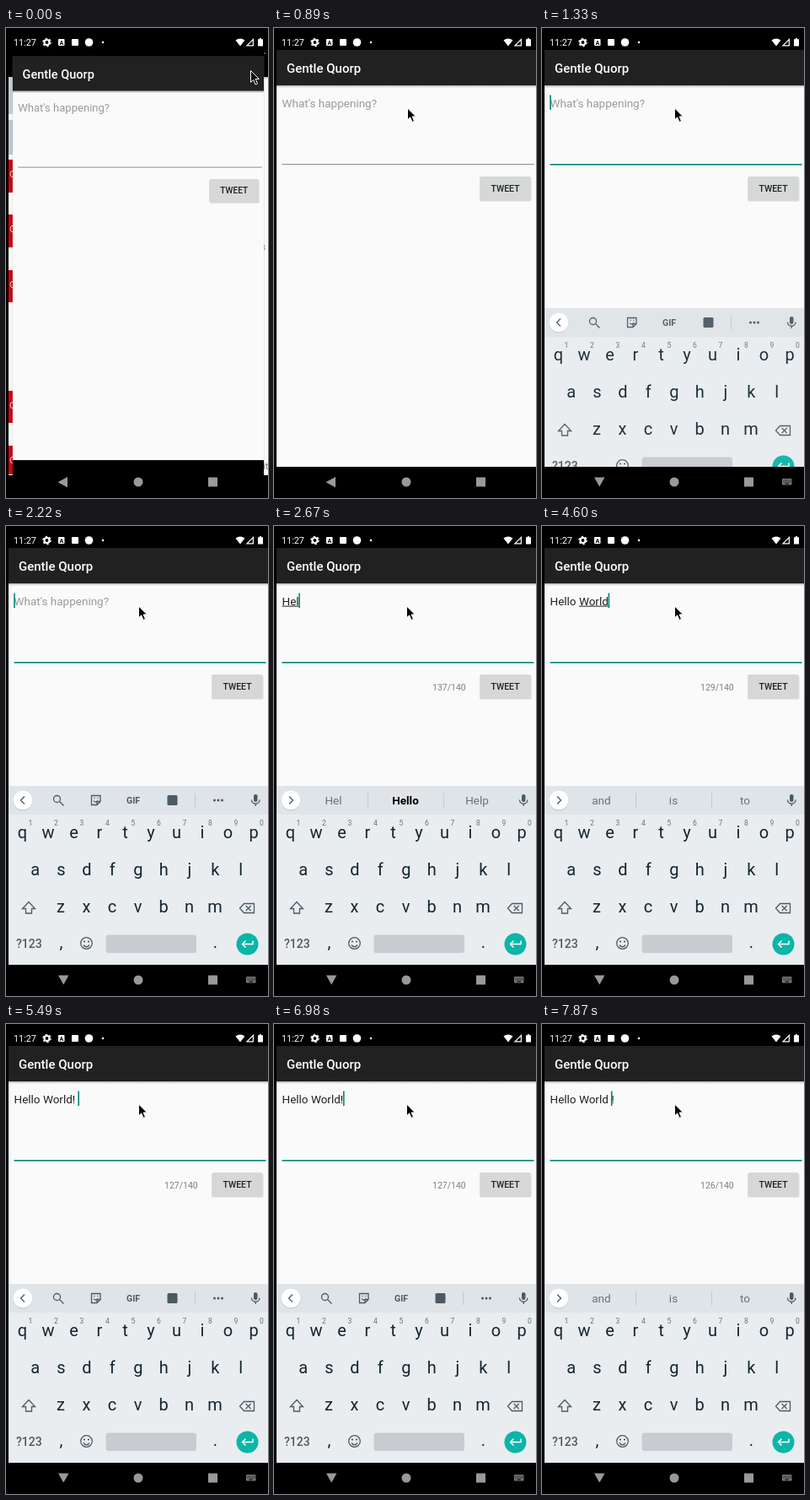
These frames come from a looping animation (311x557 px, 8 s). An HTML page:

```html
<!DOCTYPE html>
<html lang="en">
<head>
<meta charset="utf-8">
<title>Compose screen</title>
<style>
  html, body { margin: 0; width: 100%; height: 100%; overflow: hidden; background: #000; }
  svg { display: block; width: 311px; height: 557px; }
  text { font-family: Roboto, sans-serif; white-space: pre; }
  .mid { text-anchor: middle; }
  .key { font-size: 20px; fill: #14252f; text-anchor: middle; }
  .hint { font-size: 8.5px; fill: #65717a; text-anchor: middle; }
  .body { font-size: 13.5px; fill: #212121; }
  .word { font-size: 13.5px; fill: #66727a; text-anchor: middle; }
  .line { fill: none; stroke: #4d5a62; stroke-width: 1.3; }
  .gray { fill: #4d5a62; }
</style>
</head>
<body>
<svg viewBox="0 0 311 557">
  <defs>
    <clipPath id="screen"><rect x="3" y="0" width="308" height="557"/></clipPath>
    <clipPath id="kbClip"><rect x="3" y="300" width="308" height="220"/></clipPath>
    <linearGradient id="shade" x2="0" y2="1">
      <stop offset="0" stop-color="#000" stop-opacity=".28"/>
      <stop offset="1" stop-color="#000" stop-opacity="0"/>
    </linearGradient>
  </defs>
  <rect width="311" height="557"/>

  <g clip-path="url(#screen)">
    <g id="feed">
      <rect x="3" y="58" width="308" height="472" fill="#fafafa"/>
      <rect x="3" y="58" width="308" height="3" fill="url(#shade)"/>
      <circle cx="307" cy="30" r="1" fill="#777"/>
      <text x="303" y="263" font-size="10" fill="#777">s</text>
      <text x="305.5" y="523" font-size="10" fill="#777">it</text>
    </g>

    <g id="app">
      <rect x="3" y="6.5" width="308" height="533"/>
      <rect x="3" y="26" width="308" height="494" fill="#fafafa"/>
      <rect x="3" y="26" width="308" height="42" fill="#212121"/>
      <rect x="3" y="68" width="308" height="3" fill="url(#shade)"/>
      <text x="15" y="53" font-size="15" font-weight="500" fill="#fff">Gentle Quorp</text>
      <text id="prompt" class="body" x="9.5" y="93.5" style="fill:#9a9a9a">What's happening?</text>
      <text id="entry" class="body" x="9.5" y="93.5"></text>
      <rect id="compose" y="94.6" height="1" fill="#212121"/>
      <rect id="caret" y="79.5" width="1.6" height="17.5" fill="#008577"/>
      <rect id="rule" x="9.5" width="299"/>
      <text id="count" x="188" y="194.5" font-size="10.5" fill="#808080"></text>
      <rect x="244" y="177" width="61.5" height="28.5" rx="2" fill="#000" opacity=".13"/>
      <rect x="244.5" y="176" width="60" height="28" rx="1.5" fill="#d6d7d7"/>
      <text class="mid" x="274.5" y="193.8" font-size="10.5" font-weight="500" fill="#212121">TWEET</text>
    </g>
  </g>

  <g clip-path="url(#kbClip)">
    <g id="board">
      <rect x="3" y="308" width="308" height="212" fill="#e9edf0"/>
      <rect x="3" y="308" width="308" height="34" fill="#dfe4e8"/>
      <circle cx="20" cy="325.8" r="11.5" fill="#000" opacity=".12"/>
      <circle cx="20" cy="325" r="11.3" fill="#fff"/>
      <path id="chevron" class="line" stroke-width="1.5"/>

      <g id="tools">
        <circle class="line" cx="60.5" cy="323.5" r="4"/>
        <path class="line" d="M63.5 326.5l5 5"/>
        <path class="line" d="M101.5 319.5h10.500v7l-4 4h-6.500zM112 326.500h-4v4M104 325.500q2 3 5 0M104.500 322.500h1M108.500 322.500h1"/>
        <text class="mid gray" x="151" y="328.7" font-size="10.5" font-weight="700">GIF</text>
        <rect class="gray" x="191.500" y="319" width="12" height="12" rx="1.500"/>
        <path d="M224.500 317v16" stroke="#c3c9cd"/>
        <circle class="gray" cx="247.500" cy="325" r="1.500"/>
        <circle class="gray" cx="252" cy="325" r="1.500"/>
        <circle class="gray" cx="256.500" cy="325" r="1.500"/>
      </g>

      <g id="words">
        <path d="M111.500 316.500v17M201.500 316.500v17" stroke="#c3c9cd"/>
        <text class="word" x="70.500" y="330"></text>
        <text class="word" x="156" y="330"></text>
        <text class="word" x="241" y="330"></text>
      </g>

      <rect class="gray" x="294" y="318" width="4.500" height="9" rx="2.250"/>
      <path class="line" d="M291.500 324.500a4.750 4.750 0 0 0 9.500 0M296.250 329v3"/>

      <g id="keys"></g>
      <path class="line" d="M27 445.500l-7.500 8h4v5.500h7v-5.500h4z"/>
      <path class="line" d="M282.500 447.500h12v11h-12l-5-5.500zM284.700 450l6 6M290.700 450l-6 6"/>
      <text x="12" y="500" font-size="14" font-weight="500" fill="#4d5a62">?123</text>
      <text class="key" x="65.500" y="500">,</text>
      <circle class="line" cx="95.500" cy="494.500" r="6.800"/>
      <path class="line" d="M92 496.500q3.500 4.500 7 0"/>
      <circle class="gray" cx="93" cy="492.500" r="1.100"/>
      <circle class="gray" cx="98" cy="492.500" r="1.100"/>
      <rect x="118.500" y="484.500" width="107.500" height="21.500" rx="3" fill="#c8ccd0"/>
      <text class="key" x="248.500" y="500">.</text>
      <circle cx="286.500" cy="495.500" r="13" fill="#0bb5a8"/>
      <path d="M293 491.500v4h-12M284.500 491.500l-4 4l4 4" fill="none" stroke="#fff" stroke-width="1.500"/>
    </g>
  </g>

  <g fill="#fff">
    <text x="9" y="21" font-size="10.800">11:27</text>
    <circle cx="48.500" cy="17" r="3" fill="none" stroke="#fff" stroke-width="2.200"/>
    <circle cx="48.500" cy="17" r="4.600" fill="none" stroke="#fff" stroke-width="1.300" stroke-dasharray="2.400 2.417"/>
    <rect x="62" y="13" width="7.500" height="8" rx="1"/>
    <text class="mid" x="65.750" y="19.800" font-size="7" font-weight="700" style="fill:#000">A</text>
    <rect x="78" y="13" width="8" height="8" rx="1"/>
    <circle cx="98.500" cy="17" r="4.800"/>
    <circle cx="115" cy="17" r="1.300"/>
    <path d="M272.500 14.500q5.500-4 11 0l-5.500 7zM294 12v9.500h-9.500z"/>
    <path d="M292.800 15v5.300h-5.300z" fill="#000"/>
    <path d="M299 13.200h2v-1.200h2v1.200h2v8.300h-6z"/>
  </g>

  <g fill="#999">
    <path id="back"/>
    <circle cx="157" cy="538" r="5.500"/>
    <rect x="240" y="532.500" width="11" height="11" rx=".5"/>
    <g id="kbIcon">
      <rect x="285" y="534" width="11.500" height="7.500" rx="1" fill="#777"/>
      <path d="M286.500 536h9M286.500 538h9" stroke="#000" stroke-dasharray="1 1"/>
      <path d="M288.500 540h4.500" stroke="#000"/>
    </g>
  </g>

  <path id="pointer" d="M0 0v13.800l3.200-3l2.300 5.600l2.500-1l-2.400-5.500h4.300z" fill="#000" stroke="#fff" stroke-width="1" stroke-linejoin="round"/>
</svg>

<script>
const LOOP = 8000;
const $ = id => document.getElementById(id);
const set = (el, attrs) => { for (const k in attrs) el.setAttribute(k, attrs[k]); };
const show = (el, on) => el.style.display = on ? "" : "none";

function add(parent, tag, attrs, text = "") {
  const el = document.createElementNS("http://www.w3.org/2000/svg", tag);
  set(el, attrs);
  el.textContent = text;
  parent.append(el);
}

function keyRow(letters, x, y, numbered) {
  [...letters].forEach((c, i) => {
    const cx = x + i * 30.5;
    add($("keys"), "text", { class: "key", x: cx, y }, c);
    if (numbered) add($("keys"), "text", { class: "hint", x: cx + 9.5, y: y - 15 }, (i + 1) % 10);
  });
}
keyRow("qwertyuiop", 19.5, 370, true);
keyRow("asdfghjkl", 34.8, 414);
keyRow("zxcvbnm", 65, 458);

// Edge of the list behind the opening screen: top, height, colour
[[60, 42, "#c3ccd6"], [109, 41, "#bcc8d4"], [156, 39, "#cc0510"], [221, 39, "#cc0510"],
 [287, 38, "#cc0510"], [430, 38, "#cc0510"], [495, 34, "#cc0510"]].forEach(([y, height, fill]) => {
  add($("feed"), "rect", { x: 3, y, width: 8, height, fill });
  if (fill === "#cc0510") add($("feed"), "circle", { cx: 9, cy: y + 17, r: 4, fill: "none", stroke: "#f0c8c8" });
});

// Step tables: time, then the values held from that time
const zoom = [[0, .968], [150, .99], [300, 1]];
const pointer = [[0, 290.5, 50.5], [590, 262, 59], [740, 190, 86], [890, 158.5, 95], [1040, 157.5, 95]];
const slide = [[0, 220, 0], [1180, 130, .6], [1330, 24, .95], [1480, 0, 1]];

// time, text, caret index (-1 hidden), start of the underlined word (-1 none), suggestions
const next = "and is to";
const typing = [
  [0, "", -1, -1],
  [1040, "", 0, -1],
  [1620, "", -1, -1],
  [2220, "", 0, -1],
  [2370, "H", 1, 0, "H *Hi Have"],
  [2520, "He", 2, 0, "He *Hey Hello"],
  [2660, "Hel", 3, 0, "Hel *Hello Help"],
  [2810, "Hello", 5, 0, "Hello *Hello Hellos"],
  [2960, "Hello ", 6, -1, "I how and"],
  [3410, "Hello W", 7, 6, "W *We What"],
  [3560, "Hello Wo", 8, 6, "Wo *Would Work"],
  [3700, "Hello Wor", 9, 6, "Wor *Work World"],
  [3850, "Hello Worl", 10, 6, "Worl *World Worlds"],
  [4000, "Hello World", 11, 6, "World *World Worlds"],
  [4150, "Hello World ", 12, -1, next],
  [4600, "Hello World", 11, 6, next],
  [4740, "Hello World", 11, 6, "World Worlds World's"],
  [5040, "Hello World!", 12, -1, "World Worlds World's"],
  [5190, "Hello World!", 12, -1],
  [5490, "Hello World! ", 13, -1],
  [6090, "Hello World! ", -1, -1],
  [6530, "Hello World! ", 13, -1],
  [6980, "Hello World! ", 12, -1],
  [7130, "Hello World! ", 11, -1],
  [7420, "Hello World! ", 11, 6, "World Worlds World's"],
  [7870, "Hello World ! ", 12, -1, next]
];
const at = (steps, t) => steps.findLast(s => s[0] <= t).slice(1);

const pen = document.createElement("canvas").getContext("2d");
pen.font = "13.5px Roboto, sans-serif";
const xAt = (text, i) => 9.5 + pen.measureText(text.slice(0, i)).width;

function drawText(t) {
  const [text, caret, start, words] = at(typing, t);
  show($("prompt"), !text);
  $("entry").textContent = text;
  $("count").textContent = text && `${140 - text.length}/140`;

  show($("caret"), caret >= 0);
  if (caret >= 0) set($("caret"), { x: xAt(text, caret) - .3 });

  show($("compose"), start >= 0);
  if (start >= 0) {
    const x = xAt(text, start);
    set($("compose"), { x, width: xAt(text, text.trimEnd().length) - x });
  }

  show($("tools"), !words);
  show($("words"), words);
  set($("chevron"), { d: words ? "M18 320.500l4.500 4.500l-4.500 4.500" : "M22 320.500l-4.500 4.500l4.500 4.500" });
  if (words) {
    const labels = $("words").querySelectorAll("text");
    words.split(" ").forEach((w, i) => {
      const bold = w[0] === "*";
      labels[i].textContent = bold ? w.slice(1) : w;
      labels[i].style.cssText = bold ? "font-weight:700;fill:#000" : "";
    });
  }
}

function render(t) {
  const [scale] = at(zoom, t);
  const [px, py] = at(pointer, t);
  const [drop, alpha] = at(slide, t);
  const focused = t >= 1040, typingOpen = t >= 1180;

  show($("feed"), t < 300);
  set($("app"), { transform: `translate(157 273) scale(${scale}) translate(-157 -273)` });
  set($("pointer"), { transform: `translate(${px} ${py})` });
  set($("board"), { transform: `translate(0 ${drop})`, opacity: alpha });
  set($("rule"), focused
    ? { y: 161, height: 1.6, fill: "#008577" }
    : { y: 161, height: 1, fill: "#8c8c8c" });
  set($("back"), { d: typingOpen ? "M62 532.500h12.500l-6.250 11z" : "M73 532v12.500l-11.500-6.250z" });
  show($("kbIcon"), typingOpen);
  drawText(t);
}

const began = performance.now();
function tick() {
  render((performance.now() - began) % LOOP);
  requestAnimationFrame(tick);
}
render(0);
requestAnimationFrame(tick);
</script>
</body>
</html>
```
